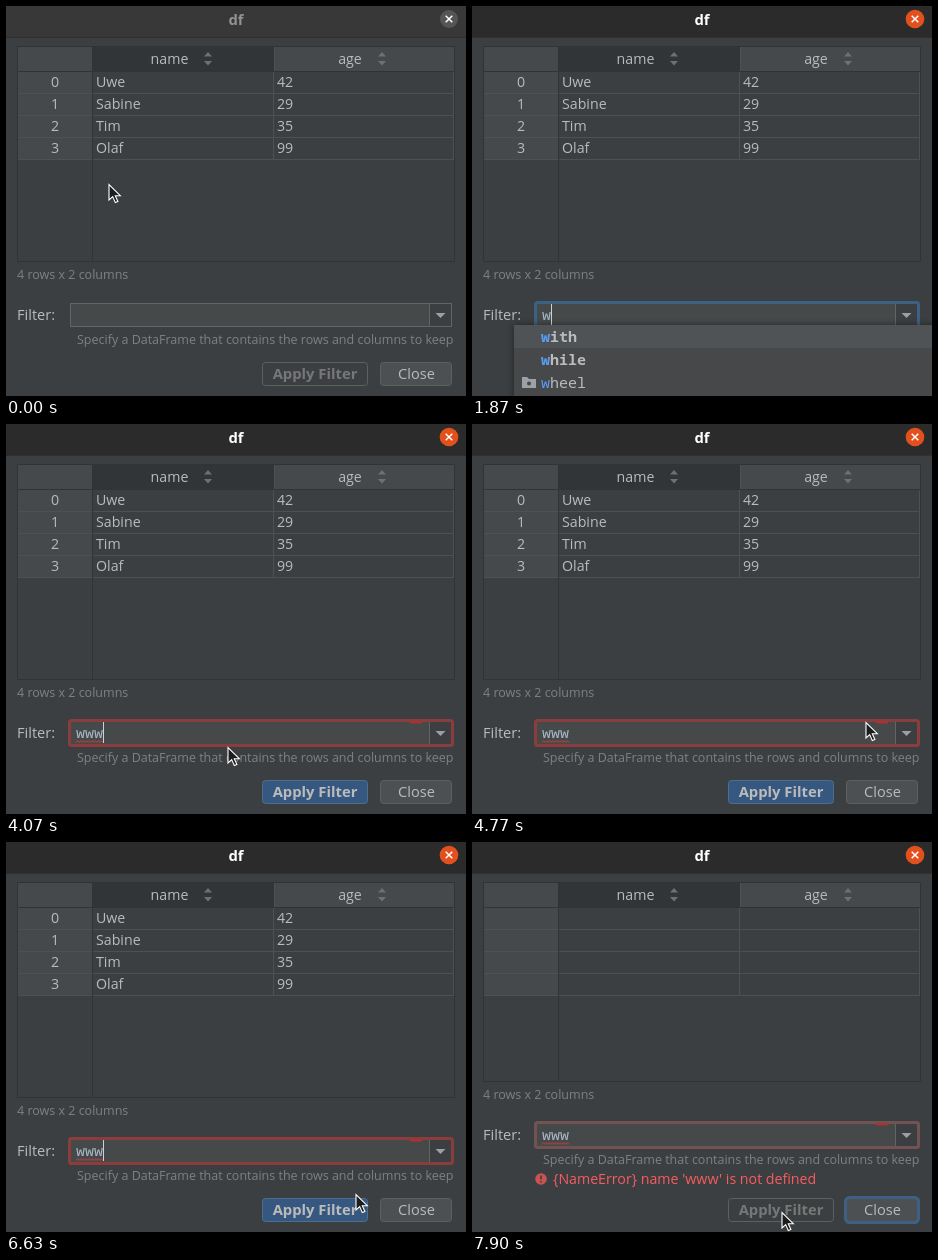
These frames come from a looping animation (460 px wide and 390 px high, 8000 ms). An HTML page:

```html
<!DOCTYPE html>
<html lang="en">
<head>
<meta charset="utf-8">
<title>Data frame filter</title>
<style>
  html, body { margin: 0; width: 100%; height: 100%; overflow: hidden; background: #3c3f41; }
  svg { display: block; width: 460px; height: 390px; }
  text { font: 14.2px "Open Sans", "Noto Sans", sans-serif; fill: #bbb; white-space: pre; }
  .label { font-size: 14.6px; }
  .mid { text-anchor: middle; }
  .bold { font-size: 14.8px; font-weight: 700; }
  .hint { font-size: 12.5px; fill: #808080; }
  .code { font: 15px "Noto Sans Mono", "DejaVu Sans Mono", monospace; fill: #a9b7c6; }
  .code .key { font-weight: 700; fill: #bbb; }
  .code .hit { fill: #589df6; }
  .line { fill: none; stroke: #4e5153; }
  .edge { fill: none; stroke: #313335; }
  .ring { fill: none; stroke-width: 3; }
  .button { fill: #4c5052; stroke: #5e6060; }
  .pop { filter: drop-shadow(0 0 3px #0007); }
</style>
</head>
<body>
<svg viewBox="0 0 460 390">
  <rect width="460" height="390" fill="#3c3f41"/>

  <!-- title bar -->
  <g data-on="0-1000">
    <rect width="460" height="31" fill="#383838"/>
    <text class="bold mid" x="230" y="19" style="fill:#929292">df</text>
    <circle cx="443" cy="13" r="9" fill="#555"/>
  </g>
  <g data-on="1000-8000">
    <rect width="460" height="31" fill="#2b2b2b"/>
    <text class="bold mid" x="230" y="19" style="fill:#fff">df</text>
    <circle cx="443" cy="13" r="9.3" fill="#e2511d"/>
  </g>
  <path d="M439.7 9.7l6.6 6.6m0-6.6l-6.6 6.6" stroke="#fff" stroke-width="1.5"/>
  <path d="M0 31.5h460" stroke="#303030"/>

  <!-- table -->
  <rect x="12" y="41" width="436" height="25" fill="#45494b"/>
  <rect x="87" y="41" width="181" height="25" fill="#313538"/>
  <rect x="12" y="66" width="74" height="88" fill="#45494b"/>
  <path class="line" d="M12 87.5h436M12 109.5h436M12 131.5h436M12 153.5h436M267.5 66v88M268.5 41v25M447.5 66v88"/>
  <path class="edge" d="M12 65.5h436"/>
  <path class="edge" data-on="0-7900" d="M11.5 40.5h437v215h-437zM86.5 41v214"/>
  <path class="edge" data-on="7900-8000" d="M11.5 40.5h437v199h-437zM86.5 41v198"/>
  <text class="mid" x="163.5" y="58">name</text>
  <text class="mid" x="344" y="58">age</text>
  <path d="M198 50.5l4-4.5 4 4.5zM198 55l4 4.5 4-4.5zM372 50.5l4-4.5 4 4.5zM372 55l4 4.5 4-4.5z" fill="#6e7173"/>
  <g id="rows" data-on="0-7830"></g>

  <!-- filter row, moves up when the error line needs room -->
  <g id="filter">
    <text class="hint" x="11" y="273">4 rows x 2 columns</text>
    <text class="label" x="11" y="314">Filter:</text>
    <text class="hint" x="71" y="338">Specify a DataFrame that contains the rows and columns to keep</text>
    <rect x="64.5" y="297.5" width="381" height="23" fill="#45494a" stroke="#646464"/>
    <path d="M424 298h21v22h-21z" fill="#3c3f41"/>
    <path d="M423.5 298v22" stroke="#646464"/>
    <path d="M429.5 307h10l-5 5z" fill="#9da0a2"/>
    <rect class="ring" data-on="1070-2530" x="63.5" y="296.5" width="383" height="25" rx="2" stroke="#3d6185"/>
    <rect class="ring" data-on="2530-7730" x="63.5" y="296.5" width="383" height="25" rx="2" stroke="#8b3c3c"/>
    <rect class="ring" data-on="7730-8000" x="63.5" y="296.5" width="383" height="25" rx="2" stroke="#725252"/>
    <path data-on="2530-8000" d="M403 298q6-2 13 0v1.5h-11z" fill="#b03030"/>
    <path class="wave" data-on="2530-2870" data-n="6"/>
    <path class="wave" data-on="2870-8000" data-n="9"/>
    <text id="typed" class="code" x="70" y="314"></text>
    <rect id="caret" y="298" width="1" height="21" fill="#d0d0d0"
      data-on="1070-1570 1800-3730 4050-4570 5070-5600 6130-6660 7070-7700"/>
  </g>

  <g data-on="7900-8000">
    <circle cx="69" cy="337" r="5.8" fill="#c75450"/>
    <path d="M69 333.5v4m0 1.5v1.6" stroke="#3c3f41" stroke-width="1.6"/>
    <text x="81" y="342" style="fill:#f75c5f">{NameError} name 'www' is not defined</text>
  </g>

  <!-- buttons -->
  <g data-on="0-1870 7730-8000">
    <rect class="button" x="256.5" y="356.5" width="105" height="23" rx="3" style="fill:#3c3f41"/>
    <text class="bold mid" x="309" y="373" style="fill:#777">Apply Filter</text>
  </g>
  <g data-on="1870-7730">
    <rect class="button" x="256.5" y="356.5" width="105" height="23" rx="3" style="fill:#365880;stroke:#4c708c"/>
    <text class="bold mid" x="309" y="373">Apply Filter</text>
  </g>
  <rect class="button" x="374.5" y="356.5" width="71" height="23" rx="3"/>
  <rect class="ring" data-on="7730-8000" x="373.5" y="355.5" width="73" height="25" rx="4" stroke="#3d6185"/>
  <text class="label mid" x="410.5" y="373">Close</text>

  <!-- completion list -->
  <g data-on="1870-2170">
    <rect class="pop" x="42" y="319" width="430" height="90" fill="#46484a"/>
    <rect x="42" y="319" width="418" height="23" fill="#4f5355"/>
    <text class="code" x="69" y="336"><tspan class="key hit" style="fill:#589df6">w</tspan><tspan class="key">ith</tspan></text>
    <text class="code" x="69" y="359"><tspan class="key hit" style="fill:#589df6">w</tspan><tspan class="key">hile</tspan></text>
    <text class="code" x="69" y="382" style="fill:#bbb"><tspan class="hit">w</tspan>heel</text>
    <path d="M50 371h5l2 2h7v9h-14z" fill="#9aa2a8"/>
    <circle cx="57" cy="377.5" r="2" fill="#46484a"/>
  </g>

  <!-- error tooltip -->
  <g data-on="4830-6630">
    <rect class="pop" x="149.5" y="298.5" width="250" height="39" fill="#4b4d4d" stroke="#585a5b"/>
    <text class="label" x="160" y="324">Unresolved reference 'www'</text>
    <path d="M386 310.5h2.4v2.4h-2.4zm0 4.5h2.4v2.4h-2.4zm0 4.5h2.4v2.4h-2.4z" fill="#b0b2b3"/>
  </g>

  <g id="pointer">
    <path id="arrow" d="M0 .5V16l3.7-3.4 2.6 6 2.6-1.2-2.6-5.7h5z" fill="#1d1d1d" stroke="#fff" stroke-width="1.1"/>
    <path id="hand" d="M-2.6 8V1.6a1.7 1.7 0 0 1 3.4 0V6l6.2 1.4q1.6.5 1.4 2.2l-1 6.4h-8.2l-4.8-5.6q-.8-1.4.8-2z" fill="#fff" stroke="#222"/>
    <g id="beam" fill="none">
      <path d="M-4-9h3l1 1 1-1h3M0-8V8M-4 9h3l1-1 1 1h3" stroke="#111" stroke-width="3"/>
      <path d="M-4-9h3l1 1 1-1h3M0-8V8M-4 9h3l1-1 1 1h3" stroke="#fff"/>
    </g>
  </g>
</svg>
<script>
const LOOP = 8000;
const $ = id => document.getElementById(id);

const people = [["Uwe", 42], ["Sabine", 29], ["Tim", 35], ["Olaf", 99]];
$("rows").innerHTML = people.map(([name, age], i) => {
  const y = 81 + 22 * i;
  return `<text class="mid" x="49" y="${y}">${i}</text>` +
    `<text x="90" y="${y}">${name}</text><text x="271" y="${y}">${age}</text>`;
}).join("");

for (const wave of document.querySelectorAll(".wave")) {
  wave.setAttribute("d", "M70 318.5" + "l1.5-2 1.5 2".repeat(wave.dataset.n));
  wave.setAttribute("fill", "none");
  wave.setAttribute("stroke", "#bc3f3c");
}

// time, x, y, shape
const moves = [
  [0, 103, 178, "arrow"], [500, 104, 188, "arrow"], [570, 106, 215, "arrow"],
  [640, 109, 252, "arrow"], [720, 111, 285, "arrow"], [800, 118, 308, "beam"],
  [1800, 0, 0, ""],
  [3730, 124, 308, "beam"], [3810, 142, 309, "beam"], [3890, 166, 313, "beam"],
  [3970, 193, 318, "beam"], [4050, 222, 323, "arrow"], [4130, 252, 323, "arrow"],
  [4210, 280, 320, "beam"], [4290, 305, 315, "beam"], [4370, 328, 310, "beam"],
  [4450, 350, 305, "beam"], [4530, 367, 302, "beam"],
  [4570, 378, 300, "beam"], [4630, 386, 300, "beam"], [4700, 392, 299, "beam"],
  [4770, 394, 298, "arrow"], [4800, 400, 298, "arrow"], [4830, 405, 298, "arrow"],
  [5130, 409, 297, "hand"],
  [6430, 404, 303, "arrow"], [6500, 390, 318, "arrow"], [6570, 372, 337, "arrow"],
  [6630, 350, 352, "arrow"], [6700, 331, 362, "arrow"], [6770, 317, 368, "arrow"],
  [6830, 310, 370, "arrow"]
];
const keys = [1800, 2130, 2500];

const timed = [...document.querySelectorAll("[data-on]")].map(el => ({
  el, spans: el.dataset.on.split(" ").map(s => s.split("-").map(Number))
}));
const show = (el, on) => { el.style.display = on ? "" : "none"; };

function draw(t) {
  for (const { el, spans } of timed) show(el, spans.some(([a, b]) => t >= a && t < b));

  const count = keys.filter(k => t >= k).length;
  const text = "w".repeat(count);
  if ($("typed").textContent !== text) $("typed").textContent = text;
  $("caret").setAttribute("x", 70 + 9 * count);
  $("filter").setAttribute("transform", `translate(0 ${t < 7900 ? 0 : -16})`);

  const [, x, y, shape] = moves.filter(m => t >= m[0]).pop();
  $("pointer").setAttribute("transform", `translate(${x} ${y})`);
  for (const id of ["arrow", "hand", "beam"]) show($(id), id === shape);
}

const start = performance.now();
function tick() {
  draw((performance.now() - start) % LOOP);
  requestAnimationFrame(tick);
}
tick();
</script>
</body>
</html>
```
